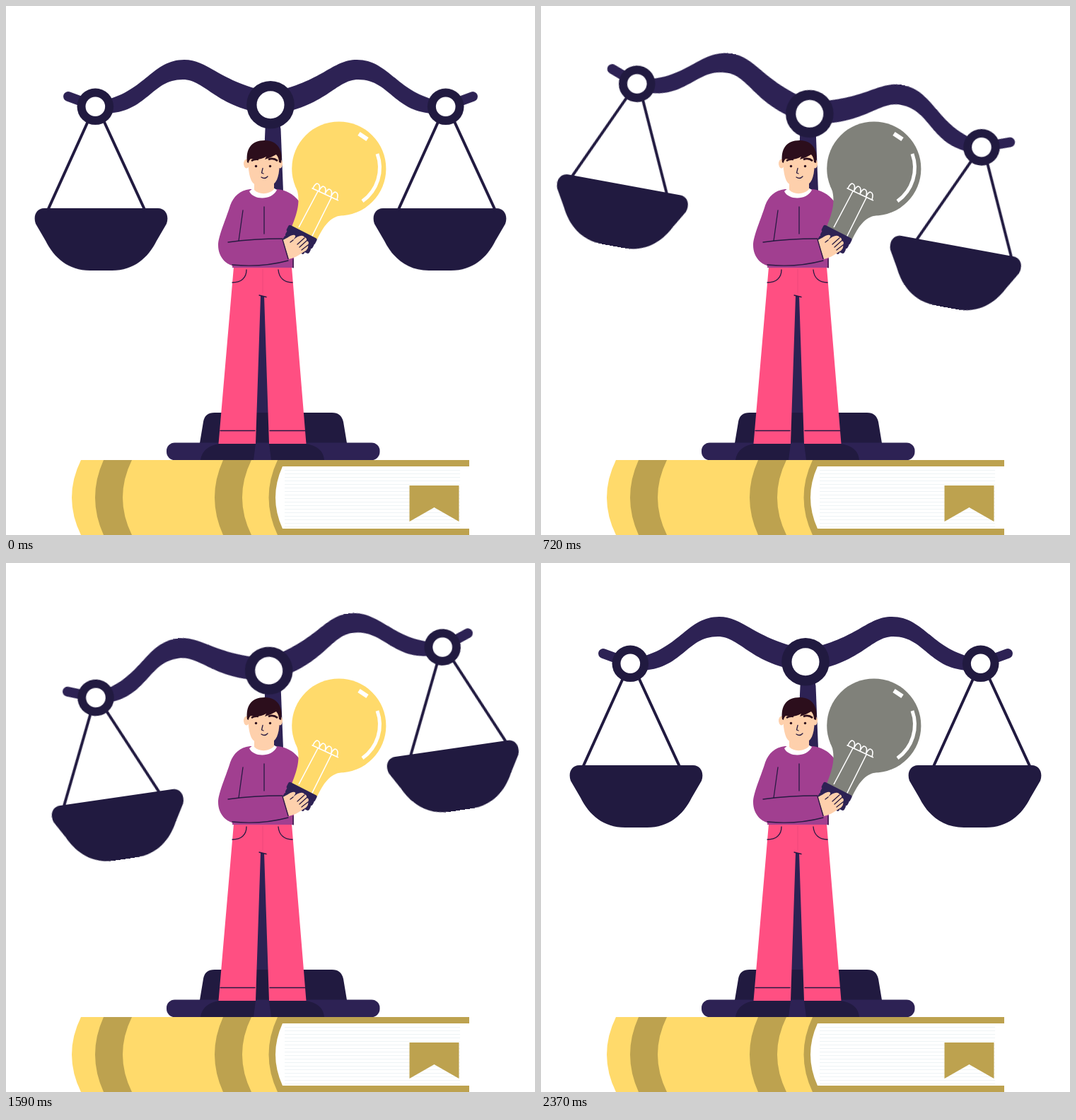
An HTML page that plays this animation: 748 px wide and 748 px high, repeating every 2.4 s.

```html
<!DOCTYPE html>
<html lang="en">
<head>
<meta charset="utf-8">
<title>Scales and idea</title>
<style>
  :root { --navy: #211a40; --indigo: #2d2254; --gold: #bda24f; --yellow: #ffda6b; --skin: #fed0ac; }
  html, body { margin: 0; width: 100%; height: 100%; overflow: hidden; background: #fff; }
  svg { display: block; width: 100vw; height: 100vh; }
  .navy { fill: var(--navy); }
  .indigo { fill: var(--indigo); }
  .gold { fill: var(--gold); }
  .yellow { fill: var(--yellow); }
  .skin { fill: var(--skin); }
  .white { fill: #fff; }
  .hair { fill: #2c0e1c; }
  .line { fill: none; stroke: #281a42; stroke-width: 1.3; stroke-linecap: round; stroke-linejoin: round; }
  .glint { fill: none; stroke: #fff; }

  .scales { transform-origin: 374px 225px; animation: sway 2400ms linear infinite; }
  .glass { fill: var(--yellow); animation: blink 1200ms step-end infinite; }

  @keyframes sway {
    0%, 98.75%, 100% { transform: translate(0px, 0px) rotate(0deg); }
    31.25% { transform: translate(-10px, 11.7px) rotate(10.85deg); }
    66.25% { transform: translate(10px, 11.6px) rotate(-8.3deg); }
  }
  @keyframes blink {
    0% { fill: var(--yellow); }
    50%, 100% { fill: #80817a; }
  }
</style>
</head>
<body>
<svg viewBox="0 0 748 748">
  <defs>
    <path id="band" d="M138 642 Q114 695 138 748 H178 Q152 695 178 642Z"/>
    <g id="arm">
      <path d="M88 128 L126 142" fill="none" stroke="#2d2254" stroke-width="14" stroke-linecap="round"/>
      <path class="indigo" d="M374 122 C300 107 287 76 252 76 C208 76 196 120 140 133 V152 C200 151 205 104 250 104 C282 104 295 143 374 154Z"/>
      <path class="navy" d="M54 286 H215 C226 286 231 297 227 308 L213 332 C201 356 181 374 150 374 H119 C88 374 68 356 56 332 L42 308 C38 297 43 286 54 286Z"/>
    </g>
    <g id="hanger">
      <path d="M116 163 L58.500 290 M138 162 L197 290" fill="none" stroke="#211a40" stroke-width="4"/>
      <circle class="navy" cx="126.300" cy="142.300" r="25.800"/>
      <circle class="white" cx="126.300" cy="142.300" r="13.800"/>
    </g>
  </defs>

  <!-- book -->
  <g>
    <path class="yellow" d="M106 642 Q80 695 106 748 H400 V642Z"/>
    <use href="#band" class="gold"/>
    <use href="#band" class="gold" x="169"/>
    <path class="gold" d="M384 642 Q359 695 384 748 H655 V642Z"/>
    <path class="white" d="M391 651 Q371 695 391 739 H656 V651Z"/>
    <path d="M518 656 V737" fill="none" stroke="#eef3f5" stroke-width="248" stroke-dasharray="1 4"/>
    <path class="gold" d="M570.500 678 H640.500 V729 L605.500 709 L570.500 729Z"/>
  </g>

  <!-- stand -->
  <path class="indigo" d="M366.500 174 Q367 167 373 167 H382 Q388 167 388.500 174 L392 262 L405 619 H348Z"/>
  <path class="navy" d="M274 618 L279 588 Q281 575 295 575 H461 Q474 575 477 588 L482 618Z"/>
  <rect class="indigo" x="227" y="617.500" width="301.500" height="24.500" rx="11.500"/>
  <path class="navy" d="M275 642 C277 628 288 621 301 619 H353 L350 642Z M375 642 L372 619 H424 C438 621 449 628 450 642Z"/>

  <g class="scales">
    <use href="#arm"/>
    <use href="#arm" transform="translate(748) scale(-1 1)"/>
    <use href="#hanger"/>
    <use href="#hanger" x="495.400"/>
    <circle class="navy" cx="374" cy="139.700" r="33.800"/>
    <circle class="white" cx="374" cy="139.700" r="19.500"/>
  </g>

  <!-- trousers -->
  <path fill="#ff4f82" d="M322 369 H404 L424.500 619 H372 L365 410 H360 L353 619 H300.500Z"/>
  <path d="M363 372 V406" fill="none" stroke="#ee487b"/>
  <path class="line" d="M340 373 C340 385 332 391 320 391 M385 373 C386 385 394 391 405 391 M358 409 L368 411.500 M303 600.500 H352 M373 600.500 H424"/>

  <!-- sweater -->
  <path fill="#a13f90" d="M345 259 C330 261 322 269 317 282 C312 299 300 325 300 338 C300 356 312 365 320 367 V370 H407 V340 L415 277 C406 265 395 260 383 259Z"/>
  <path class="line" d="M335 289 L329 332 M365 284 V322 M314 334 Q350 329 391 329 M320 366 Q362 370 399 360 M406 358 V370"/>

  <!-- head -->
  <path class="white" d="M344 262 C350 275 376 275 383 260 L378 257 H350Z"/>
  <path class="skin" d="M351 245 H379 V259 C372 267 357 267 351 260Z"/>
  <ellipse class="skin" cx="340" cy="223" rx="4" ry="6.500"/>
  <ellipse class="skin" cx="387.500" cy="223" rx="3.500" ry="6.500"/>
  <path class="skin" d="M342 207 H387 C387 225 387 241 381 249 C375 257 356 257 349 250 C343 243 342 225 342 207Z"/>
  <path class="hair" d="M341 221 C339 203 346 190 366 190 C384 190 392 204 389 222 L386 221 C386 217 385 213 382 210 C377 213 372 215 366 217 L368 213 C361 217 353 218 346 216 C344 218 343 220 343 222Z"/>
  <path d="M347 219 Q351 216 357 217 M371 217 Q378 214 384 219" fill="none" stroke="#2c0e1c" stroke-width="2.600"/>
  <circle class="hair" cx="353.500" cy="226.500" r="1.700"/>
  <circle class="hair" cx="373.500" cy="226.500" r="1.700"/>
  <path class="line" d="M363 229.500 L361.500 236 L364 237 M361 242 Q366 245.500 370 241"/>

  <!-- bulb -->
  <g class="glass">
    <circle cx="470.800" cy="230" r="66.600"/>
    <path d="M408 250 C418 272 413 290 404 312 L440 330 C449 312 457 299 474 296Z"/>
  </g>
  <g class="glint">
    <path d="M499 180.500 L511 188.500" stroke-width="6"/>
    <path d="M525 209 A58 58 0 0 1 504 276" stroke-width="5"/>
    <path d="M441 262 L414 313 M460 271 L432 327 M432.500 257.500 L470 275 M434 258 c4-11 12-8 8.500 4 c4-11 12-8 8.500 4 c4-11 12-8 8.500 4 c4-11 12-8 8.500 4" stroke-width="1.600" stroke-linejoin="round"/>
  </g>
  <g class="indigo" transform="translate(420 320) rotate(27)">
    <rect x="-22.500" y="-1" width="45" height="10" rx="2.500"/>
    <rect x="-21" y="7" width="43" height="9" rx="3"/>
    <rect x="-21" y="15" width="42" height="9" rx="3"/>
    <rect x="1" y="21" width="14" height="7" rx="2.500"/>
  </g>

  <!-- hand -->
  <path class="skin" d="M391.500 331 C399 328 403 323 408 324 C411 325 408 328 406 331 C413 324 420 323 422 327 C426 328 425 331 425 332 C429 333 428 336 427 338 C428 341 426 344 424 346 C417 350 410 356 400 358Z"/>
  <path class="line" d="M391 330 L399 357.500 M406 331 L402 334 M422 328 L412 337 M425 332 L415 341 M427 338 L418 345"/>
</svg>
</body>
</html>
```
